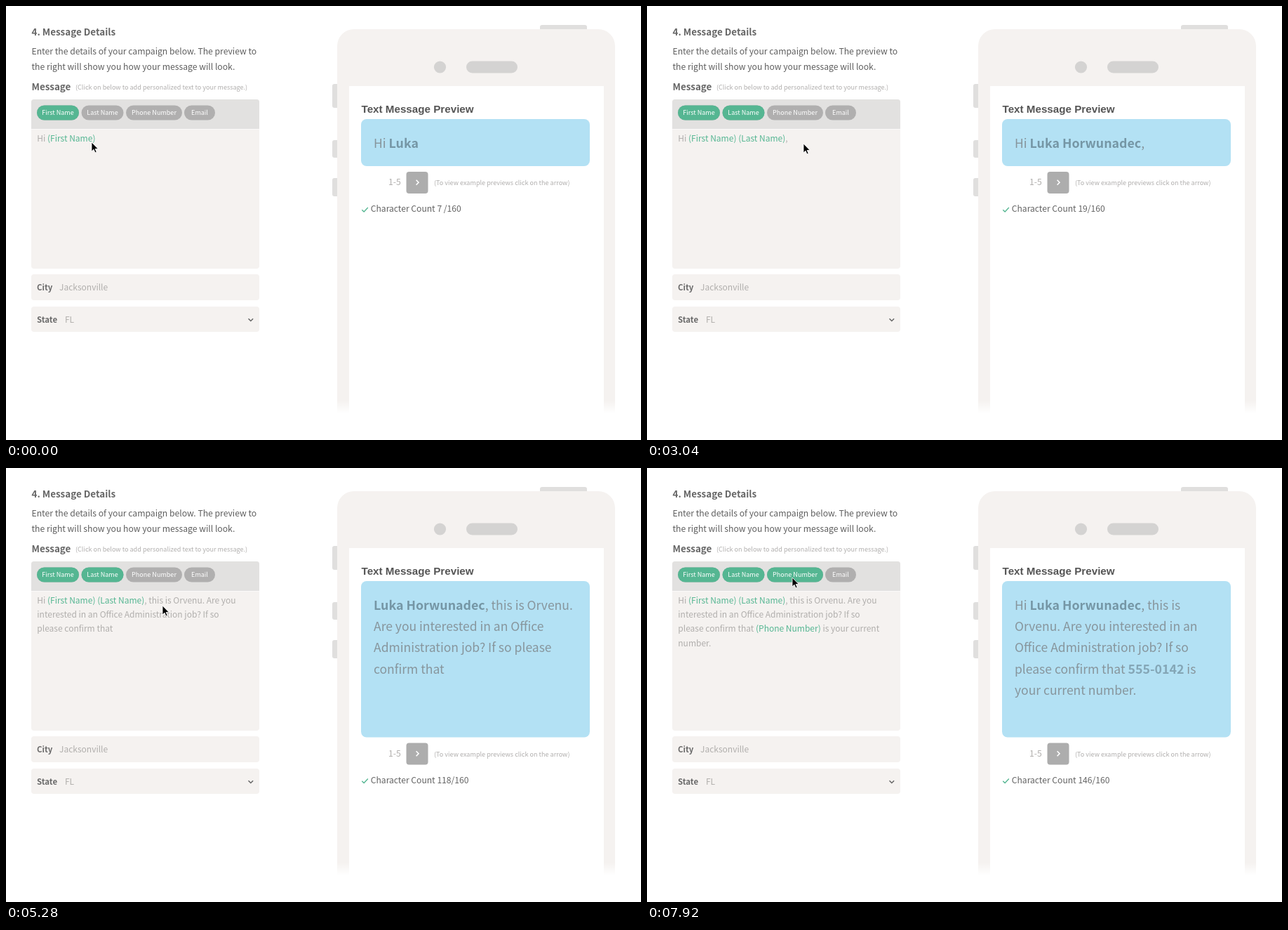
These frames come from a looping animation (905 by 618 pixels, 8000 ms). An HTML page:

```html
<!DOCTYPE html>
<html lang="en">
<head>
<meta charset="utf-8">
<title>Message details</title>
<style>
html, body { margin: 0; width: 100%; height: 100%; overflow: hidden; background: #fff; }
svg { display: block; width: 905px; height: 618px; }
text { font: 12px "Noto Sans CJK JP", "Noto Sans CJK SC", "Noto Sans CJK", "Open Sans", sans-serif; fill: #b0aeac; white-space: pre; }
.head { font-size: 13.4px; font-weight: 700; fill: #666; }
.para { font-size: 12.18px; fill: #5e5e5e; }
.label { font-size: 11.4px; font-weight: 700; fill: #6a6a6a; }
.hint { font-size: 9.08px; fill: #b0aead; }
.chip { font-size: 9.05px; font-weight: 500; fill: #fff; text-anchor: middle; }
.title { font: 700 15.2px "Liberation Sans", Arial, sans-serif; fill: #555; }
.big { font-size: 17.5px; fill: #87959c; }
.big tspan { font-size: 17.8px; font-weight: 700; fill: #7596a5; }
.big .soft { fill: #84a6b6; }
.count { font-size: 12.1px; fill: #626262; }
.field { fill: #f5f2f0; }
.tag { fill: #55b692; }
</style>
</head>
<body>
<svg viewBox="0 0 905 618">
  <defs>
    <linearGradient id="fade" x2="0" y2="1">
      <stop stop-color="#fff" stop-opacity="0"/>
      <stop offset="1" stop-color="#fff"/>
    </linearGradient>
  </defs>

  <text class="head" x="36.5" y="42">4. Message Details</text>
  <text class="para" x="36.5" y="69.3">Enter the details of your campaign below. The preview to</text>
  <text class="para" x="36.5" y="91">the right will show you how your message will look.</text>
  <text class="head" x="36.5" y="119.7">Message</text>
  <text class="hint" x="99" y="118.7">(Click on below to add personalized text to your message.)</text>

  <rect class="field" x="36" y="133" width="325" height="241" rx="4"/>
  <path d="M36 175V137a4 4 0 0 1 4-4H357a4 4 0 0 1 4 4V175Z" fill="#e2e1e0"/>
  <rect x="36" y="175" width="325" height="1" fill="#fff" opacity=".6"/>
  <g id="chips"></g>

  <text x="44.3" y="193">Hi <tspan class="tag">(First Name)</tspan><tspan class="tag" data-from="1"> (Last Name)</tspan><tspan data-from="1">,</tspan><tspan data-from="2"> this is Orvenu. Are you</tspan></text>
  <text x="44.3" y="213.2"><tspan data-from="2">interested in an Office Administration job? If so</tspan></text>
  <text x="44.3" y="233.4"><tspan data-from="2">please confirm that </tspan><tspan class="tag" data-from="3">(Phone Number)</tspan><tspan data-from="3"> is your current</tspan></text>
  <text x="44.3" y="253.6"><tspan data-from="3">number.</tspan></text>

  <rect class="field" x="36" y="382" width="325" height="37" rx="4"/>
  <text class="label" x="44" y="405.4">City</text>
  <text x="76" y="405.4">Jacksonville</text>
  <rect class="field" x="36" y="428" width="325" height="36" rx="4"/>
  <text class="label" x="44" y="451">State</text>
  <text x="84" y="451">FL</text>
  <path d="M345.5 445.2l3.3 3.3 3.3-3.3" fill="none" stroke="#666" stroke-width="1.5"/>

  <g fill="#e0dfde">
    <rect x="761" y="27" width="67" height="10" rx="3"/>
    <rect x="465" y="111" width="10" height="34" rx="3"/>
    <rect x="465" y="191" width="10" height="25" rx="3"/>
    <rect x="465" y="245" width="10" height="26" rx="3"/>
  </g>
  <path class="field" d="M472 580V57a24 24 0 0 1 24-24H844a24 24 0 0 1 24 24V580Z"/>
  <circle cx="618.5" cy="87" r="8.6" fill="#d4d3d2"/>
  <rect x="656" y="78.5" width="73" height="17" rx="8.5" fill="#d4d3d2"/>
  <rect x="489" y="114" width="363" height="470" fill="#fff"/>
  <rect x="465" y="562" width="410" height="18" fill="url(#fade)"/>
  <text class="title" x="506.5" y="151.8">Text Message Preview</text>
  <g id="preview"></g>

  <path id="cursor" d="M0 0V13L3 10.2 5 14.8 7.1 13.9 5.1 9.5H9.2Z" fill="#000" stroke="#fff" stroke-width=".8"/>
</svg>

<script>
const $ = id => document.getElementById(id);
const clamp = v => Math.min(1, Math.max(0, v));

// Chips: label, left, width, stage at which each turns green
$('chips').innerHTML = [
  ['First Name', 44, 60, 0], ['Last Name', 107.5, 60, 1],
  ['Phone Number', 171, 80, 3], ['Email', 254, 44, 9]
].map(([label, x, w, from]) => {
  const box = `x="${x}" y="141.5" width="${w}" height="21" rx="10.5"`;
  return `<rect ${box} fill="#b0afaf"/><rect ${box} class="tag" data-from="${from}"/>
    <text class="chip" x="${x + w / 2}" y="155.3">${label}</text>`;
}).join('');

// Blue bubble with the controls under it, shown from one stage until another
const bubble = (h, from, until) => `<g data-from="${from}" data-until="${until}">
  <rect x="506" y="161" width="326" height="${h}" rx="8" fill="#b3e1f4"/>
  <g transform="translate(0 ${161 + h})">
    <text x="545" y="27.2" style="font-size:12.2px">1-5</text>
    <rect x="570.5" y="8" width="31" height="31" rx="4" fill="#adadad"/>
    <path d="M584.6 19.7l3.4 3.5-3.4 3.5" fill="none" stroke="#fff" stroke-width="1.6"/>
    <text class="hint" x="610" y="27.2">(To view example previews click on the arrow)</text>
    <path d="M507.3 62.2l2.9 2.9 5.6-6" fill="none" stroke="#55b692" stroke-width="1.4"/>
  </g></g>`;

// Preview text of one stage with its character count
const message = (stage, h, count, lines) => `<g data-from="${stage}" data-until="${stage + 1}">
  ${lines.map((s, i) => `<text class="big" x="524" y="${201.5 + i * 30.35}">${s}</text>`).join('')}
  <text class="count" x="519.8" y="${226.4 + h}">Character Count ${count}/160</text></g>`;

const person = '<tspan>Luka Horwunadec</tspan>';
$('preview').innerHTML = bubble(67, 0, 2) + bubble(222.5, 2, 4) +
  message(0, 67, '7 ', ['Hi <tspan>Luka</tspan>']) +
  message(1, 67, 19, [`Hi ${person},`]) +
  message(2, 222.5, 118, [`${person}, this is Orvenu.`, 'Are you interested in an Office',
    'Administration job? If so please', 'confirm that']) +
  message(3, 222.5, 146, [`Hi ${person}, this is`, 'Orvenu. Are you interested in an',
    'Office Administration job? If so',
    'please confirm that <tspan class="soft">555-0142</tspan> is', 'your current number.']);

const starts = [-1000, 1150, 4128, 7250];
const fadeTime = 238;
const staged = [...document.querySelectorAll('[data-from]')];
const moves = [ // start, end, x, y
  [-2, -1, 122, 194], [300, 900, 153, 147], [2200, 2900, 223, 196], [5700, 6400, 207, 156]
];

function draw(t) {
  const shown = k => k in starts ? clamp((t - starts[k]) / fadeTime) : 0;
  for (const el of staged) {
    const { from, until = 9 } = el.dataset;
    const a = Math.min(shown(from), 1 - shown(until));
    el.style[el.tagName === 'tspan' ? 'fillOpacity' : 'opacity'] = a;
  }
  let x = 0, y = 0;
  for (const [a, b, toX, toY] of moves) {
    const p = clamp((t - a) / (b - a)), e = p * p * (3 - 2 * p);
    x += (toX - x) * e;
    y += (toY - y) * e;
  }
  $('cursor').setAttribute('transform', `translate(${x} ${y})`);
}

const begin = performance.now();
function tick() {
  draw((performance.now() - begin) % 8000);
  requestAnimationFrame(tick);
}
tick();
</script>
</body>
</html>
```
